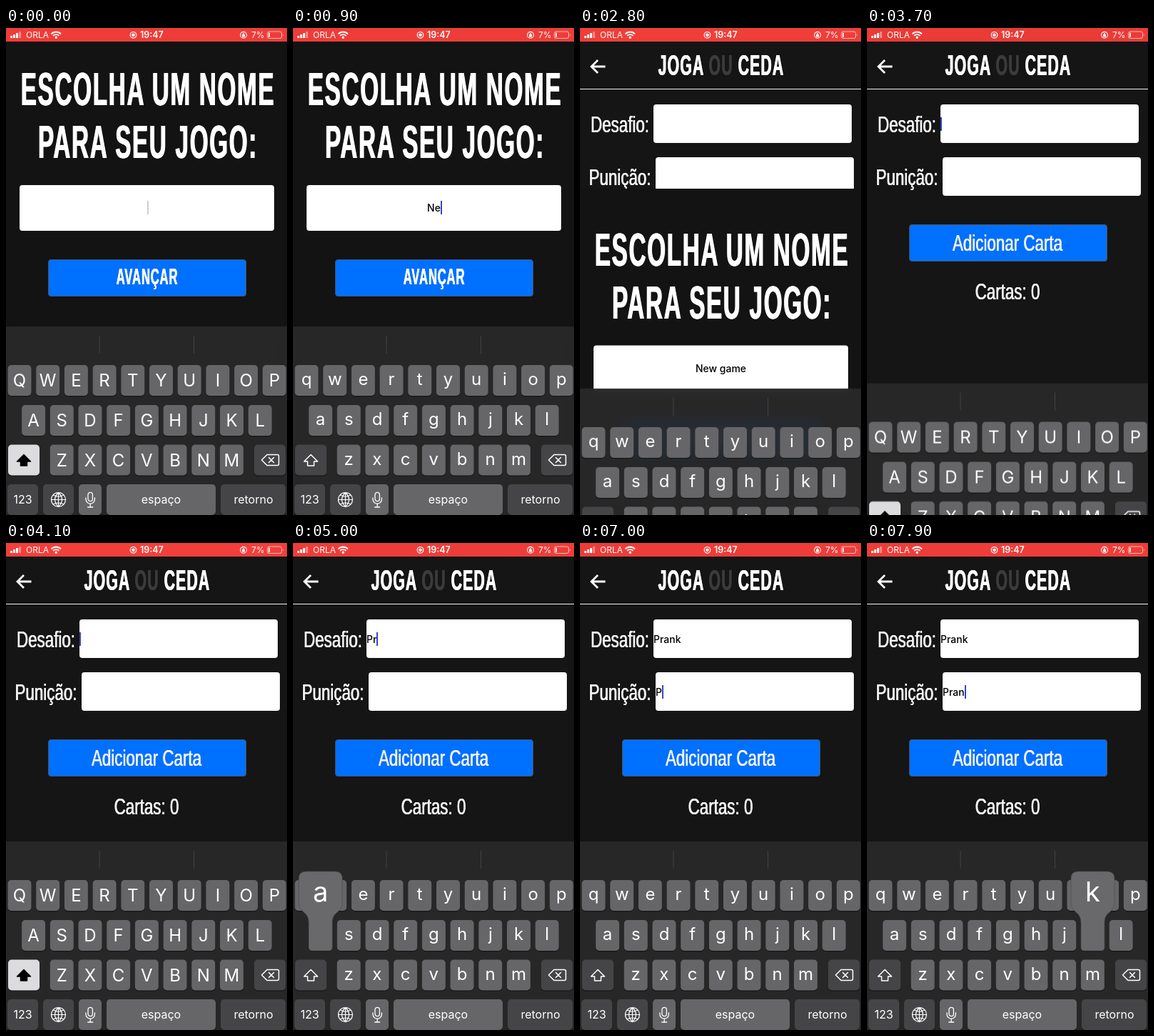
An HTML page that plays this animation: 394 by 682 pixels, repeating every 8000 ms.

```html
<!DOCTYPE html>
<html lang="pt-BR">
<head>
<meta charset="utf-8">
<title>Novo jogo</title>
<style>
html, body { margin: 0; width: 100%; height: 100%; overflow: hidden; background: #151515; }
#stage { position: relative; width: 394px; height: 682px; overflow: hidden; background: #151515; font-family: Inter, Roboto, sans-serif; }
#stage > div, .field, .btn, .t, svg { position: absolute; }
.screen { inset: 0; background: #151515; }
#nameScreen { background: #131313; animation: drop 8s infinite; }

/* condensed display face and condensed text face */
.t { color: #fff; font-family: "Liberation Sans", Arial, sans-serif; line-height: 1; white-space: nowrap; }
.display { font-weight: 700; letter-spacing: .05em; transform: translate(-50%, -50%) scaleX(.52); text-shadow: .015em 0, -.015em 0; }
.label { color: #f2f2f2; font-size: 31.5px; transform: translate(-50%, -50%) scaleX(.71); text-shadow: .013em 0, -.013em 0; }
.title { font-size: 64px; left: 198.5px; }
.dim { color: #3b3b3d; }

.field { background: #fff; border-radius: 4px; display: flex; align-items: center; font-size: 14px; font-weight: 500; color: #000; white-space: pre; }
.field i { position: relative; width: 0; height: 19px; opacity: 0; }
.field i::after { content: ""; position: absolute; left: 0; width: 2px; height: 19px; background: #3348c4; }
.btn { left: 59px; width: 278px; height: 52px; box-sizing: border-box; background: #0070ff; border: 1px solid #4c5468; border-radius: 4px; }
#go { animation: tap 8s infinite; }
.rule { position: absolute; left: 0; top: 84.5px; width: 100%; height: 1.5px; background: #f2f2f2; }

#kb { left: 0; top: 418px; width: 394px; height: 264px; background: rgba(41, 41, 42, .95); backdrop-filter: blur(8px); animation: keyboard 8s infinite; }
#kb svg { left: 0; top: 0; overflow: visible; }
#kb text { fill: #fff; text-anchor: middle; font-family: Inter, Roboto, sans-serif; }
.key { fill: #666568; }
.fn { fill: #454547; }
.shade { fill: #171718; }
.ico { fill: none; stroke: #fff; stroke-width: 1.5; stroke-linejoin: round; stroke-linecap: round; }

#status { left: 0; top: 0; width: 394px; height: 19px; background: #ee3d38; animation: pulse 2s infinite; }
#status text { fill: #fff; font-family: Inter, Roboto, sans-serif; font-size: 12px; }

@keyframes drop {
  0%, 33.75% { transform: none; animation-timing-function: ease; }
  39.625%, 100% { transform: translateY(682px); }
}
@keyframes keyboard {
  0%, 33.75% { transform: none; animation-timing-function: ease; }
  39.625%, 45% { transform: translateY(264px); animation-timing-function: cubic-bezier(.17, .84, .44, 1); }
  50%, 100% { transform: none; }
}
@keyframes tap {
  0%, 30.6% { opacity: 1; }
  31.6%, 32.4% { opacity: .45; }
  34.4%, 100% { opacity: 1; }
}
@keyframes pulse {
  0%, 50%, 100% { background: #ee3d38; }
  25% { background: #ff433f; }
  75% { background: #e03632; }
}
</style>
</head>
<body>
<div id="stage">
  <div class="screen">
    <svg width="394" height="86"><path d="M35.500 54H16M25 45L16 54l9 9" fill="none" stroke="#fff" stroke-width="2.800"/></svg>
    <span class="t display" style="left:198px;top:51.5px;font-size:41px">JOGA <span class="dim">OU</span> CEDA</span>
    <div class="rule"></div>
    <span class="t label" style="left:55.5px;top:135.5px">Desafio:</span>
    <div class="field" id="dare" style="left:103px;top:107px;width:278px;height:54px"><span></span><i></i></div>
    <span class="t label" style="left:56px;top:209.5px">Punição:</span>
    <div class="field" id="penalty" style="left:106px;top:181px;width:278px;height:54px"><span></span><i></i></div>
    <div class="btn" style="top:275px"></div>
    <span class="t label" style="left:197px;top:302px">Adicionar Carta</span>
    <span class="t label" style="left:197px;top:369.5px">Cartas: 0</span>
  </div>

  <div class="screen" id="nameScreen">
    <span class="t display title" style="top:85.5px">ESCOLHA UM NOME</span>
    <span class="t display title" style="top:159.5px">PARA SEU JOGO:</span>
    <div class="field" id="name" style="left:19px;top:220px;width:357px;height:63.5px;justify-content:center"><span></span><i></i></div>
    <div id="go">
      <div class="btn" style="top:324px"></div>
      <span class="t display" style="left:198px;top:348px;font-size:32px">AVANÇAR</span>
    </div>
  </div>

  <div id="kb"><svg width="394" height="264"></svg></div>

  <div id="status">
    <svg width="394" height="20">
      <g fill="#fff">
        <rect x="6" y="11" width="3" height="3" rx=".5"/>
        <rect x="10" y="9" width="3" height="5" rx=".5"/>
        <rect x="14" y="7" width="3" height="7" rx=".5"/>
        <rect x="18" y="5" width="3" height="9" rx=".5" opacity=".4"/>
      </g>
      <text x="28" y="14">ORLA</text>
      <g fill="none" stroke="#fff" stroke-width="1.900">
        <path d="M63.500 8.300a9.500 9.500 0 0 1 13.500 0M66 10.900a6 6 0 0 1 8.500 0"/>
        <circle cx="70.250" cy="13.200" r=".8"/>
        <circle cx="178.500" cy="9.800" r="4.300" stroke-width="1.200"/>
        <circle cx="333" cy="9.800" r="4.400" stroke-width="1.100"/>
      </g>
      <circle cx="178.500" cy="9.800" r="2.300" fill="#fff"/>
      <text x="188" y="14" font-weight="600" style="font-size:12.5px">19:47</text>
      <path d="M331 9.500h4v3h-4zM331.700 9.500v-1a1.300 1.300 0 0 1 2.600 0v1" fill="#fff"/>
      <text x="344" y="14">7%</text>
      <rect x="366.500" y="5" width="20" height="9.500" rx="2.500" fill="none" stroke="#fff" stroke-opacity=".65"/>
      <rect x="368" y="6.500" width="1.800" height="6.500" rx=".8" fill="#fff"/>
      <path d="M388 8v3.500q1.700-1.700 0-3.500" fill="#fff" opacity=".65"/>
    </svg>
  </div>
</div>

<script>
const LOOP = 8000, HOLD = 110, KEY_W = 33, KEY_H = 43;

// each entry: field, focus time, blur time, word, press time of each key
const plan = [
  { id: 'name', at: -650, until: 2500, word: 'New game', press: [400, 750, 1080, 1370, 1640, 1840, 2020, 2180] },
  { id: 'dare', at: 3600, until: 6250, word: 'Prank', press: [4450, 4720, 4980, 5230, 5480] },
  { id: 'penalty', at: 6250, until: LOOP, word: 'Prank', press: [6800, 7080, 7340, 7600, 7850] }
];
const rows = [['qwertyuiop', 19, 54], ['asdfghjkl', 38.6, 110], ['zxcvbnm', 78.2, 165.5]];

const svg = document.querySelector('#kb svg');
const keys = {};

function el(tag, attrs, text) {
  const node = document.createElementNS('http://www.w3.org/2000/svg', tag);
  for (const k in attrs) node.setAttribute(k, attrs[k]);
  if (text) node.textContent = text;
  return svg.appendChild(node);
}
function keyCap(x, y, width, cls) {
  const box = { x, width, height: KEY_H, rx: 5 };
  el('rect', { ...box, y: y + 1.3, class: 'shade' });
  return el('rect', { ...box, y, class: cls });
}
function caption(x, text, size) {
  el('text', { x, y: 248, 'font-size': size }, text);
}
function icon(d) {
  return el('path', { d, class: 'ico' });
}

for (const x of [131, 263.5]) el('path', { d: `M${x} 13v25`, stroke: '#434345' });
for (const [letters, first, y] of rows) {
  [...letters].forEach((c, i) => {
    const x = first + i * 39.7;
    keyCap(x - KEY_W / 2, y, KEY_W, 'key');
    keys[c] = { x, y, label: el('text', { x, 'font-size': 24 }) };
  });
}

const shift = keyCap(3, 165.5, 44, 'fn');
const arrow = icon('M25 179.500l9.500 9.500h-5v6h-9v-6h-5z');
keyCap(348, 165.5, 44, 'fn');
icon('M366 179.500h14.500q2 0 2 2v11q0 2-2 2H366l-7.500-7.500zM368.500 183.500l7 7m0-7l-7 7');
keyCap(2, 221, 43, 'fn');
caption(23.5, '123', 16);
keyCap(52, 221, 43, 'fn');
icon('M63.500 242.500a10 10 0 1 0 20 0a10 10 0 1 0-20 0h20M73.500 232.500v20M73.500 232.500q-10 10 0 20q10-10 0-20M66 236q7.500 4 15 0M66 249q7.500-4 15 0').style.strokeWidth = 1.2;
keyCap(102, 221, 32, 'key');
icon('M115 235.500a3.200 3.200 0 0 1 6.400 0v6a3.200 3.200 0 0 1-6.400 0zM112 240v2a6.200 6.200 0 0 0 12.400 0v-2M118.200 248.500v4.500m-3.500 0h7').style.strokeWidth = 1.3;
const space = keyCap(141, 221, 153, 'key');
caption(217.5, 'espaço', 16);
keyCap(301, 221, 91, 'fn');
caption(347, 'retorno', 16);

const bubble = el('path', { fill: '#69686b', stroke: '#4b4b4d', 'stroke-width': .6 });
const big = el('text', { 'font-size': 38 });

function bubblePath(key) {
  const l = key.x - KEY_W / 2, r = l + KEY_W, y = key.y, top = y - 68;
  const a = Math.min(Math.max(key.x - 30.5, 2), 331), b = a + 61;
  return `M${a + 10} ${top}H${b - 10}q10 0 10 10V${y - 26}C${b} ${y - 8} ${r} ${y - 14} ${r} ${y + 4}` +
    `V${y + 38}q0 5-5 5H${l + 5}q-5 0-5-5V${y + 4}C${l} ${y - 14} ${a} ${y - 8} ${a} ${y - 26}V${top + 10}q0-10 10-10z`;
}

let wasCaps;
function setCaps(caps) {
  if (caps === wasCaps) return;
  wasCaps = caps;
  for (const c in keys) {
    const { label, y } = keys[c];
    label.textContent = caps ? c.toUpperCase() : c;
    label.setAttribute('y', y + (caps ? 30 : 28));
  }
  shift.style.fill = caps ? '#dcdcdf' : '';
  arrow.style.fill = caps ? '#000' : 'none';
  arrow.style.stroke = caps ? '#000' : '#fff';
}

function caretAlpha(since) {
  const d = since % 1000;
  if (d < 520) return 1;
  if (d < 700) return (700 - d) / 180;
  return d < 850 ? 0 : (d - 850) / 150;
}

function showPress(char) {
  const key = char && keys[char.toLowerCase()];
  space.style.fill = char === ' ' ? '#454547' : '';
  bubble.style.display = big.style.display = key ? '' : 'none';
  if (!key) return;
  bubble.setAttribute('d', bubblePath(key));
  big.textContent = char;
  big.setAttribute('x', Math.min(Math.max(key.x, 32.5), 361.5));
  big.setAttribute('y', key.y - 26.5);
}

function render(t) {
  const active = plan.filter(p => p.at <= t).pop();
  for (const p of plan) {
    const done = p.press.filter(at => at + HOLD <= t).length;
    const [text, caret] = document.getElementById(p.id).children;
    text.textContent = p.word.slice(0, done);
    const last = done ? p.press[done - 1] + HOLD : p.at;
    caret.style.opacity = p === active && t < p.until ? caretAlpha(t - last) : 0;
    if (p === active) {
      setCaps(done === 0);
      showPress(p.press[done] <= t ? p.word[done] : '');
    }
  }
}

let start;
function tick(now) {
  start ??= now;
  render((now - start) % LOOP);
  requestAnimationFrame(tick);
}
render(0);
requestAnimationFrame(tick);
</script>
</body>
</html>
```
